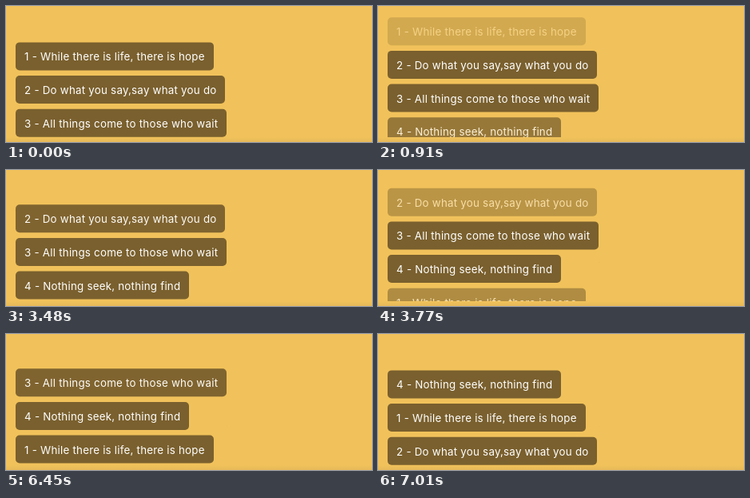
Recreate the animation shown at these times as an HTML page. Size 458 by 170 pixels, loop 8000 ms.

```html
<!DOCTYPE html>
<html lang="en">
<head>
<meta charset="utf-8">
<style>
html, body { margin: 0; width: 100%; height: 100%; overflow: hidden; background: #f1c25b; }
#list { position: absolute; left: 0; top: 0; width: 458px; height: 163.6px; overflow: hidden; }
#list div {
  position: absolute; left: 12.3px; top: 0; height: 35px; padding: 0 10.8px;
  border-radius: 5px; background: #7a602e; color: #fff; white-space: pre;
  font: 13.33px/36px Inter, sans-serif; letter-spacing: 0.23px;
}
#edge {
  position: absolute; left: 0; top: 164px; width: 458px; height: 6px;
  background: linear-gradient(#f1c25b, #e7b959);
}
</style>
</head>
<body>
<div id="list"></div>
<div id="edge"></div>
<script>
const LOOP = 8000, PITCH = 41.65, TOP = 45.4, MOVE = 588, STEP = 29;
const starts = [471, 3451, 6421];
const list = document.getElementById('list');
const items = [
  'While there is life, there is hope',
  'Do what you say,say what you do',
  'All things come to those who wait',
  'Nothing seek, nothing find'
].map((text, i) => {
  const el = document.createElement('div');
  el.textContent = `${i + 1} - ${text}`;
  return list.appendChild(el);
});

// Linear move whose first visible step comes STEP ms after its start.
const progress = dt => dt < STEP ? 0 : Math.min(1, dt / MOVE);

function draw(now) {
  const t = now % LOOP;
  const shift = starts.reduce((sum, s) => sum + progress(t - s), 0);
  items.forEach((el, i) => {
    const slot = (i - shift + 4) % 4;
    const row = slot > 3 ? slot - 4 : slot;
    el.style.transform = `translateY(${TOP + row * PITCH}px)`;
    el.style.opacity = Math.min(1, Math.abs(slot - 3));
  });
  requestAnimationFrame(draw);
}
draw(performance.now());
</script>
</body>
</html>
```
